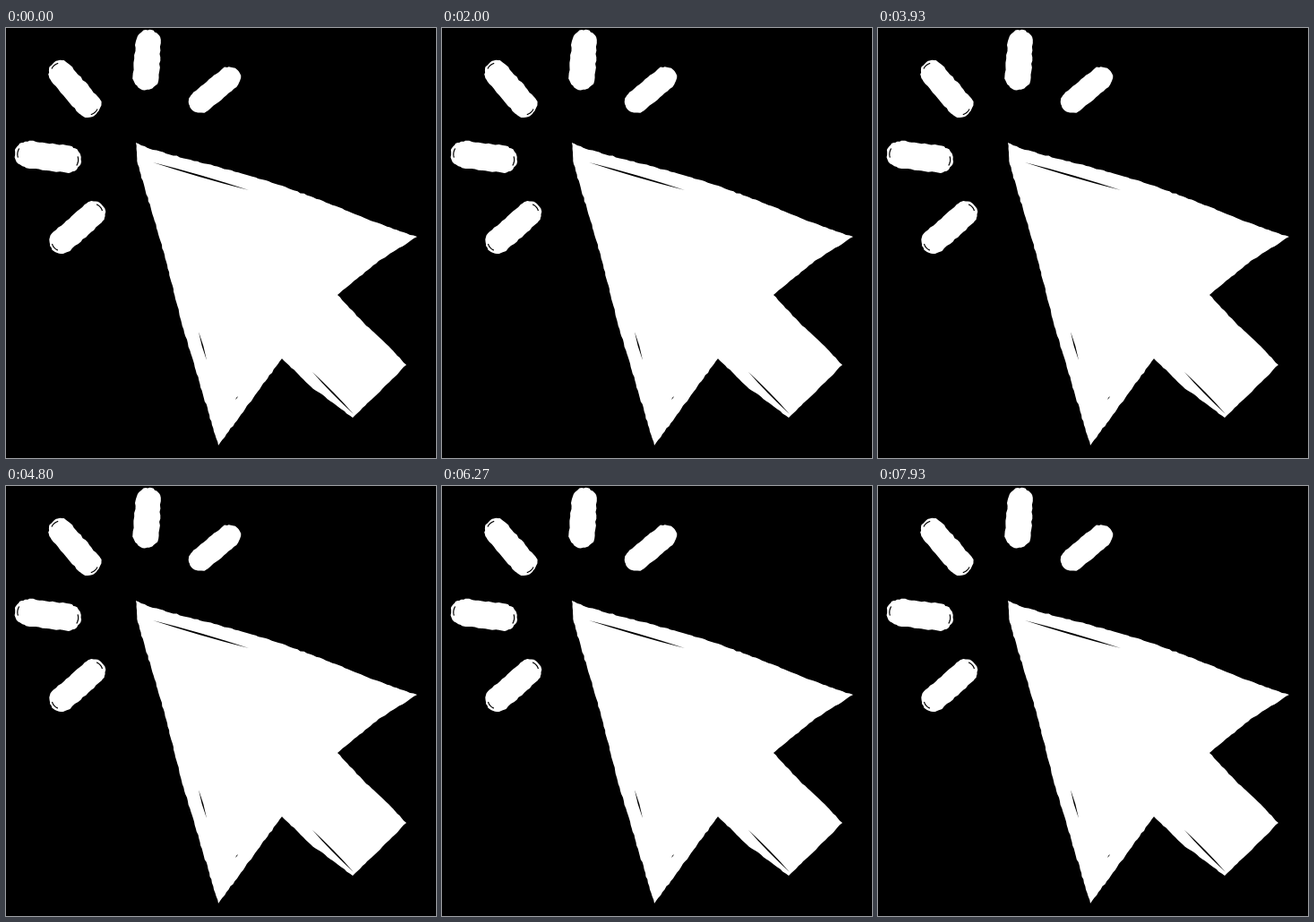
These frames come from a looping animation (480x480 px, 8000 ms). An HTML page:

```html
<!DOCTYPE html>
<html lang="en">
<head>
<meta charset="utf-8">
<title>Click pointer</title>
<style>
  html, body { margin: 0; width: 100%; height: 100%; overflow: hidden; background: #000; }
  svg { display: block; width: 100%; height: 100%; }
  g { fill: #fff; transform-origin: 0 0; }
  .ink { fill: #000; }
  .scratch { fill: none; stroke: #000; stroke-width: 1.2; }
</style>
</head>
<body>
<svg viewBox="0 0 480 480">
  <g id="rays"></g>
  <g id="arrow"></g>
</svg>
<script>
const LOOP = 8000;
const TICK = LOOP / 120;
const HOLD = 14.5; // ticks per pose
const REST = 'translate(0px, 0px) scale(1, 1)';
const GROWN = 'translate(-13.3px, -12.8px) scale(1.0575, 1.053)';

// Tip, along the upper edge to the right wing, around the stem, to the lower wing.
const ARROW = `145,128 164,136 240,156 290,170 343,189 400,212 440,227 459,233
  416,260 370,298 400,330 427,355 447,376 387,435 340,400 308,369 237,466 196,329 177,253 147,152`;

const rays = document.getElementById('rays');
const arrow = document.getElementById('arrow');

let seed = 17;
function random() {
  seed = (seed * 16807) % 2147483647;
  return seed / 2147483647;
}
const jitter = amount => (random() - 0.5) * amount;
const polar = (x, y, radius, angle) => [x + radius * Math.cos(angle), y + radius * Math.sin(angle)];
const polyline = points => 'M' + points.map(p => p.map(v => v.toFixed(1)).join(' ')).join('L');

function addPath(parent, d, className = '') {
  const path = document.createElementNS('http://www.w3.org/2000/svg', 'path');
  path.setAttribute('d', d);
  path.setAttribute('class', className);
  parent.append(path);
}

function arc(x, y, radius, from, to, steps) {
  return Array.from({ length: steps + 1 }, (_, i) =>
    polar(x, y, radius, from + (to - from) * i / steps));
}

// Closed outline whose corners stay sharp while the edges look torn.
function torn(corners, wobble) {
  const points = corners.flatMap(([x, y], i) => {
    const [nx, ny] = corners[(i + 1) % corners.length];
    const steps = Math.ceil(Math.hypot(nx - x, ny - y) / 4);
    return Array.from({ length: steps }, (_, k) => {
      const amount = k ? wobble : 0;
      return [x + (nx - x) * k / steps + jitter(amount), y + (ny - y) * k / steps + jitter(amount)];
    });
  });
  return polyline(points) + 'Z';
}

// Capsule from one cap centre to the other; scratches follow the rounded ends.
function addRay(x1, y1, x2, y2, radius, scratched) {
  const angle = Math.atan2(y2 - y1, x2 - x1);
  const caps = [[x2, y2, angle], [x1, y1, angle + Math.PI]];
  const outline = caps.flatMap(([x, y, out]) =>
    arc(x, y, radius, out - Math.PI / 2, out + Math.PI / 2, 10)
      .map(([px, py]) => [px + jitter(1.2), py + jitter(1.2)]));
  addPath(rays, torn(outline, 1.4));
  if (!scratched) return;
  for (const [x, y, out] of caps) {
    addPath(rays, polyline(arc(x, y, radius * 0.78, out - 0.45, out + 0.45, 6)), 'scratch');
  }
}

// Thin sliver tapering to both ends.
function addCrack(x1, y1, x2, y2, width) {
  const length = Math.hypot(x2 - x1, y2 - y1);
  const mx = (x1 + x2) / 2, my = (y1 + y2) / 2;
  const ox = (y1 - y2) / length * width, oy = (x2 - x1) / length * width;
  addPath(arrow, `M${x1} ${y1}Q${mx + ox} ${my + oy} ${x2} ${y2}Q${mx - ox} ${my - oy} ${x1} ${y1}Z`, 'ink');
}

// Hard switching between two values, starting and ending on the first.
function toggle(element, property, first, second) {
  const frames = [{ offset: 0, [property]: first, easing: 'steps(1, end)' }];
  for (let k = 1; k <= 8; k++) {
    const time = Math.ceil(k * HOLD) * TICK - 4;
    frames.push({ offset: time / LOOP, [property]: k % 2 ? second : first, easing: 'steps(1, end)' });
  }
  frames.push({ offset: 1, [property]: first });
  element.animate(frames, { duration: LOOP, iterations: Infinity });
}

addPath(arrow, torn(ARROW.split(/\s+/).map(p => p.split(',').map(Number)), 1));
addCrack(164, 150, 271, 181, 2);
addCrack(215, 339, 224, 371, 1.6);
addCrack(342, 384, 388, 431, 1.8);
addCrack(256, 415, 259, 411, 1);

addRay(159, 16, 156, 55, 14.3, false);
addRay(61, 50, 92, 86, 14, true);
addRay(24.5, 141, 69, 147, 15, true);
addRay(62, 238, 97, 207, 14, true);
addRay(217, 82, 249, 56, 13, false);

toggle(rays, 'opacity', 1, 0);
toggle(arrow, 'transform', REST, GROWN);
</script>
</body>
</html>
```
